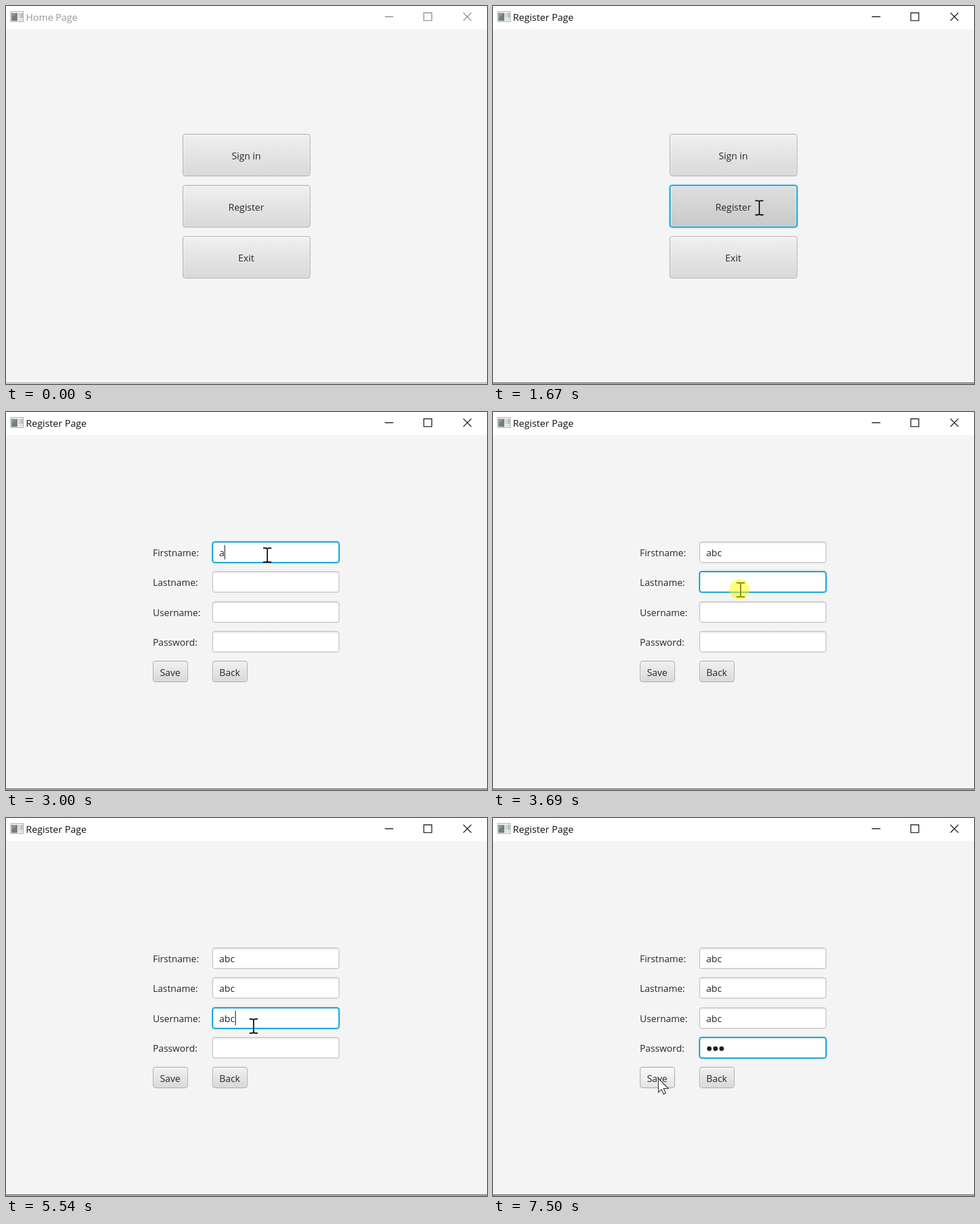
Recreate the animation shown at these times as an HTML page. Size 845x663 px, loop 8 s.

```html
<!DOCTYPE html>
<html lang="en">
<head>
<meta charset="utf-8">
<title>Register Page</title>
<style>
  html, body { margin: 0; width: 100%; height: 100%; overflow: hidden; background: #f4f4f4; }
  svg { display: block; width: 845px; height: 663px; }
  text { font: 16.6px "Open Sans", "Noto Sans", sans-serif; fill: #282828; }
  #title { font-size: 16.9px; }
  .label { font-size: 16.4px; }
  .mid { text-anchor: middle; }
</style>
</head>
<body>
<svg id="stage" viewBox="0 0 845 663" xmlns="http://www.w3.org/2000/svg">
  <defs>
    <linearGradient id="face" x2="0" y2="1"><stop stop-color="#efefef"/><stop offset="1" stop-color="#d9d9d9"/></linearGradient>
    <linearGradient id="hover" x2="0" y2="1"><stop stop-color="#f8f8f8"/><stop offset="1" stop-color="#e5e5e5"/></linearGradient>
    <linearGradient id="pressed" x2="0" y2="1"><stop stop-color="#dedede"/><stop offset="1" stop-color="#c9c9c9"/></linearGradient>
    <linearGradient id="shine" x2="0" y2="1"><stop stop-color="#fff"/><stop offset="1" stop-color="#e6e6e6"/></linearGradient>
    <linearGradient id="inset" x2="0" y2="1"><stop stop-color="#ebebeb"/><stop offset=".14" stop-color="#fff"/></linearGradient>
  </defs>
  <rect width="845" height="663" fill="#f4f4f4"/>
  <rect width="845" height="40.5" fill="#fff"/>
  <g id="icon">
    <rect x="8" y="9.5" width="22.5" height="18" fill="#f3f3f3" stroke="#a9a9a9"/>
    <rect x="9.5" y="12" width="10.5" height="14" fill="#70817b"/>
    <path d="M9.5 12h10.5l-10.5 9z" fill="#8b9993"/>
    <rect x="21.5" y="12" width="3" height="9" fill="#d2d2d2"/>
    <rect x="25.5" y="12" width="4" height="9" fill="#b5bbb8"/>
    <rect x="21.5" y="22" width="8" height="4" fill="#e2e2e2"/>
  </g>
  <text id="title" x="35" y="26"></text>
  <path id="controls" d="M665.5 18.7H680.5M734 12H748V25.6H734ZM803.5 11.8L817.5 25.8M817.5 11.8L803.5 25.8" fill="none" stroke-width="1.4"/>
  <rect id="edge" y="660.3" width="845" height="1.9"/>
  <g id="home"></g>
  <g id="form"></g>
  <rect id="caret" width="1.4" height="25" fill="#333"/>
  <path id="arrow" d="M.5 .8V25.3L6 20.1 9.8 28.3 13.4 26.7 9.7 18.6 18 18.3Z" fill="#fff" stroke="#111" stroke-width="1.1"/>
  <path id="beam" d="M-7.3 -12.4H-3Q0 -12.4 0 -10V10Q0 12.4 -3 12.4H-7.3M7.3 -12.4H3Q0 -12.4 0 -10M0 10Q0 12.4 3 12.4H7.3" fill="none" stroke="#111" stroke-width="2.1"/>
  <circle id="click" r="18" fill="#ff0" opacity=".5"/>
</svg>
<script>
const LOOP = 8000;
const PRESS = 1430, RENAME = 1590, OPEN = 1740;
const FLASH = 80, BLINK = 500;
const BLUE = '#079fd3', BUTTON_LINE = '#b0b0b0', FIELD_LINE = '#c1c1c1';

const ROWS = [
  { label: 'Firstname', click: 2520, typing: 2830, pace: 235 },
  { label: 'Lastname', click: 3690, typing: 3930, pace: 230 },
  { label: 'Username', click: 4850, typing: 5080, pace: 230 },
  { label: 'Password', click: 5940, typing: 6560, pace: 160 }
];
const rowTop = i => Math.round(228 + i * 52.3);

const linear = u => u;
const easeIn = u => u * u;
const easeOut = u => 1 - (1 - u) ** 4;
const smooth = u => u * u * (3 - 2 * u);

// Pointer moves; it rests in between
const ENTRY = { x: 614, y: 650 };
const MOVES = [
  { from: 430, to: 1190, x: 466, y: 342, easeX: easeIn, easeY: easeOut },
  { from: RENAME, to: 1820, x: 481, y: 376, easeX: easeIn },
  { from: 1910, to: 2370, x: 444, y: 243 },
  { from: 2600, to: 2750, x: 459, y: 251 },
  { from: 3220, to: 3460, x: 435, y: rowTop(1) + 32 },
  { from: 4460, to: 4700, x: 435, y: rowTop(2) + 32 },
  { from: 5540, to: 5770, x: 450, y: rowTop(3) + 21 },
  { from: 6800, to: 7500, x: 290, y: 456 }
];

const $ = id => document.getElementById(id);
const set = (el, attrs) => { for (const k in attrs) el.setAttribute(k, attrs[k]); };
const show = (el, on) => el.setAttribute('visibility', on ? 'inherit' : 'hidden');
const clamp = (v, lo, hi) => Math.max(lo, Math.min(hi, v));
const box = (x, y, w, h, r, rest) =>
  `<rect x="${x}" y="${y}" width="${w}" height="${h}" rx="${r}" ${rest}/>`;
const glow = (x, y, w, h) =>
  box(x - 1, y - 1, w + 2, h + 2, 5, `class="glow" fill="none" stroke="${BLUE}" stroke-opacity=".2" stroke-width="3"`);

const button = (id, label, x, y, w, h) => `<g id="${id}">
  ${glow(x, y, w, h)}
  ${box(x, y + 1.4, w, h, 4.5, 'fill="#fcfcfc"')}
  ${box(x, y, w, h, 4, 'class="line" fill="url(#shine)"')}
  ${box(x + 2, y + 2, w - 4, h - 3.5, 2.5, 'class="face" fill="url(#face)"')}
  <text class="mid" x="${x + w / 2 - .4}" y="${y + h / 2 + 7.3}">${label}</text></g>`;

const field = ({ label }, i) => {
  const y = rowTop(i);
  return `<text class="label" x="258" y="${y + 25}">${label}:</text><g id="field${i}">
  ${glow(363, y, 222, 36)}
  ${box(363, y, 222, 36, 4, 'class="line" fill="url(#inset)"')}
  <text class="value" x="374.5" y="${y + 25}"></text></g>`;
};

$('home').innerHTML = ['Sign in', 'Register', 'Exit']
  .map((s, i) => button('home' + i, s, 311, 225 + i * 89.7, 223, 73)).join('');
$('form').innerHTML = ROWS.map(field).join('')
  + button('save', 'Save', 258.6, 437.2, 60.4, 36)
  + button('back', 'Back', 363.2, 437.2, 60.4, 36);

function setFocus(group, on, idle) {
  set(group.querySelector('.line'), { stroke: on ? BLUE : idle, 'stroke-width': on ? 2 : 1.4 });
  show(group.querySelector('.glow'), on);
}
document.querySelectorAll('g[id]:has(> .face)').forEach(g => setFocus(g, false, BUTTON_LINE));

const dotLayer = document.createElementNS('http://www.w3.org/2000/svg', 'g');
dotLayer.innerHTML = [0, 1, 2]
  .map(i => `<circle cx="${380 + i * 10.8}" cy="404.6" r="4.1" fill="#222"/>`).join('');
$('form').append(dotLayer);

function pointer(t) {
  let { x, y } = ENTRY;
  for (const m of MOVES) {
    const u = clamp((t - m.from) / (m.to - m.from), 0, 1);
    x += (m.x - x) * (m.easeX || smooth)(u);
    y += (m.y - y) * (m.easeY || m.easeX && linear || smooth)(u);
  }
  return [x, y];
}

const typedCount = (row, t) => clamp(Math.floor((t - row.typing) / row.pace) + 1, 0, 3);

function drawForm(t) {
  const current = Math.max(0, ROWS.filter(r => t >= r.click).length - 1);
  ROWS.forEach((row, i) => {
    const group = $('field' + i), count = typedCount(row, t);
    setFocus(group, i === current, FIELD_LINE);
    if (i < 3) group.querySelector('.value').textContent = 'abc'.slice(0, count);
    else [...dotLayer.children].forEach((d, n) => show(d, n < count));
  });

  const row = ROWS[current], count = typedCount(row, t);
  const caretStart = row.click + FLASH;
  const lastInput = count ? row.typing + (count - 1) * row.pace : caretStart;
  show($('caret'), t >= caretStart && t < lastInput + BLINK);
  set($('caret'), { x: 374.3 + count * (current === 3 ? 10.6 : 9.4), y: rowTop(current) + 5.5 });
}

function drawPointer(t) {
  const [x, y] = pointer(t);
  const overField = x > 362 && x < 586 && ROWS.some((_, i) => y > rowTop(i) && y < rowTop(i) + 37);
  const isBeam = t >= RENAME && overField;
  const transform = `translate(${x} ${y})`;
  set($('arrow'), { transform });
  set($('beam'), { transform });
  show($('arrow'), t >= MOVES[0].from && !isBeam);
  show($('beam'), isBeam);

  const clicks = [PRESS, ...ROWS.map(r => r.click)];
  set($('click'), { cx: x - 2, cy: y - 1 });
  show($('click'), clicks.some(at => t >= at && t < at + FLASH));

  const overSave = t >= OPEN && x > 258 && x < 320 && y > 437 && y < 474;
  set($('save').querySelector('.face'), { fill: overSave ? 'url(#hover)' : 'url(#face)' });
}

function draw(t) {
  const active = t >= PRESS, onForm = t >= OPEN;
  $('title').textContent = t >= RENAME ? 'Register Page' : 'Home Page';
  $('title').style.fill = active ? '#111' : '#999';
  set($('controls'), { stroke: active ? '#111' : '#888' });
  set($('edge'), { fill: active ? '#686868' : '#b0b0b0' });
  show($('home'), !onForm);
  show($('form'), onForm);

  setFocus($('home1'), active, BUTTON_LINE);
  set($('home1').querySelector('.face'), { fill: active ? 'url(#pressed)' : 'url(#face)' });
  drawForm(t);
  drawPointer(t);
}

const start = performance.now();
function tick() {
  draw((performance.now() - start) % LOOP);
  requestAnimationFrame(tick);
}
tick();
</script>
</body>
</html>
```
